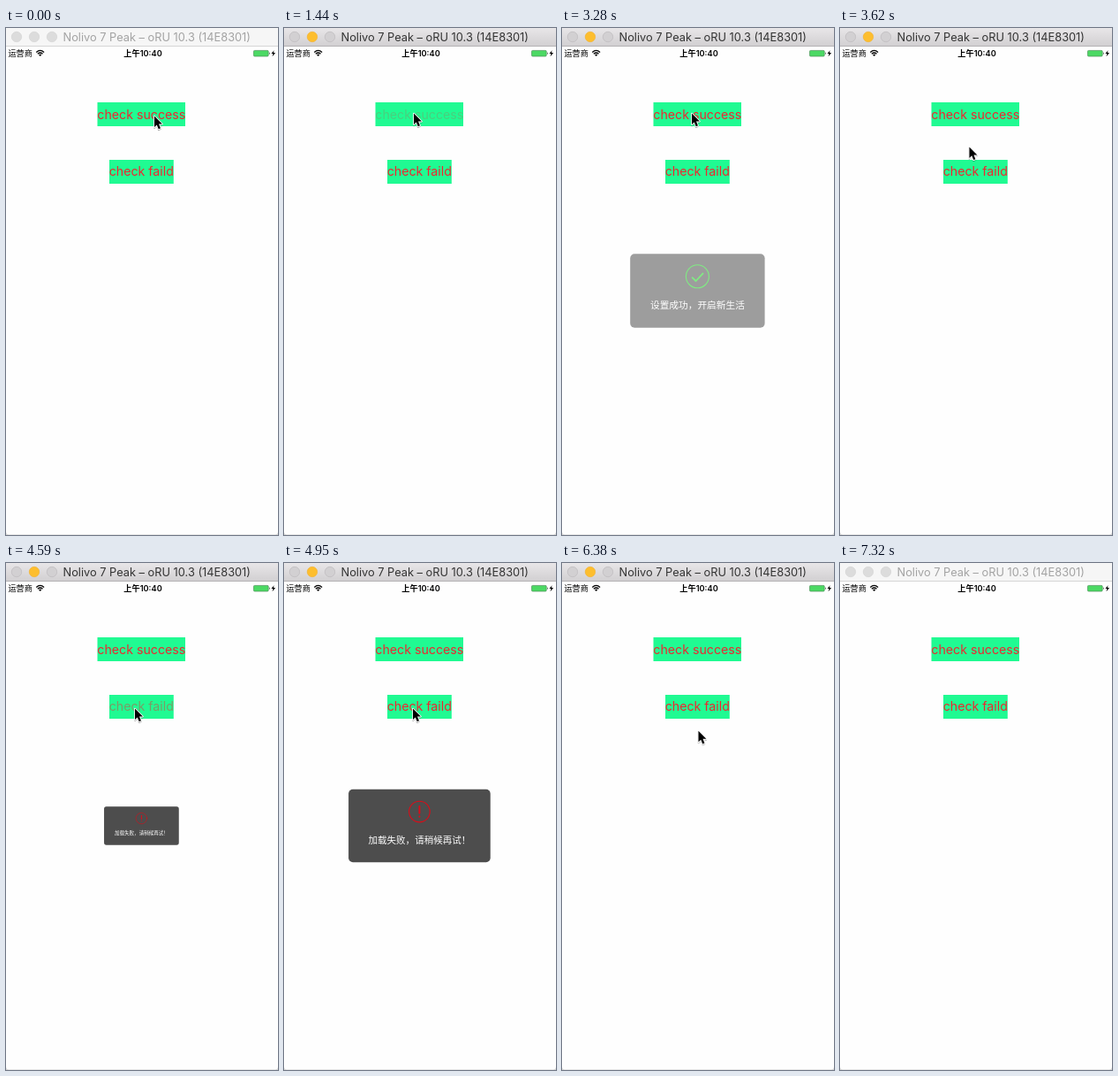
Recreate the animation shown at these times as an HTML page. Size 308 px wide and 573 px high, loop 7420 ms.

```html
<!DOCTYPE html>
<html lang="zh-CN">
<head>
<meta charset="utf-8">
<title>Toast demo</title>
<style>
  html, body { margin: 0; width: 100%; height: 100%; overflow: hidden; background: #fefefe; }
  svg { display: block; width: 100%; height: 100%; }
  text { font-family: Inter, Roboto, sans-serif; }
  .cjk { font-family: "Noto Sans CJK SC", "Noto Sans CJK", sans-serif; }
  .mid { text-anchor: middle; }
  .label { font-size: 14.2px; fill: #ee2630; }
  .msg { font-size: 10.7px; fill: #fff; }
  .line { fill: none; stroke-linecap: round; stroke-linejoin: round; }
</style>
</head>
<body>
<svg viewBox="0 0 308 573">
  <defs>
    <linearGradient id="chrome" x2="0" y2="1">
      <stop offset="0" stop-color="#e8e6e8"/>
      <stop offset="1" stop-color="#d2d0d2"/>
    </linearGradient>
    <filter id="shadow" x="-50%" y="-50%" width="200%" height="200%">
      <feDropShadow dx="0" dy="1" stdDeviation="0.9" flood-opacity="0.4"/>
    </filter>
  </defs>

  <rect width="308" height="573" fill="#d4d4d4"/>
  <rect y="-5" width="308" height="577.5" rx="3.5" fill="#fefefe"/>

  <rect id="bar" width="308" height="20"/>
  <rect id="edge" y="20" width="308" height="1"/>
  <g id="lights"></g>
  <text id="title" x="277" y="14.8" font-size="12.8" text-anchor="end">Nolivo 7 Peak – oRU 10.3 (14E8301)</text>

  <text class="cjk" x="2.5" y="32.2" font-size="9.1">运营商</text>
  <g class="line" stroke="#000" stroke-width="1.3" style="stroke-linecap:butt">
    <path d="M34.3 27.4Q38.7 23.4 43.1 27.4"/>
    <path d="M35.9 29.2Q38.7 26.7 41.5 29.2"/>
  </g>
  <path d="M37.1 30.2Q38.7 28.9 40.3 30.2L38.7 32Z"/>
  <text class="mid" x="155" y="32" font-size="9.2" font-weight="600"><tspan class="cjk">上午</tspan>10:40</text>
  <rect x="280.4" y="25.4" width="16.8" height="6.6" rx="1.2" fill="#4cd964" stroke="#4b8e58" stroke-width=".7"/>
  <path d="M298 27.3q1.4 1.4 0 2.8z"/>
  <path d="M303.6 25.2L300.4 29.1H302.4L301.6 32.2L305 28.1H302.9Z"/>

  <rect x="103.5" y="84" width="99.5" height="27" fill="#20fa92"/>
  <text id="okLabel" class="label mid" x="153.3" y="102.7">check success</text>
  <rect x="117" y="149" width="72.8" height="27" fill="#20fa92"/>
  <text id="badLabel" class="label mid" x="153.3" y="167.2">check faild</text>

  <g id="okToast">
    <rect x="77.2" y="255.2" width="152.4" height="83.6" rx="5" fill="#4d4d4d"/>
    <g class="line" stroke="#16dc1c">
      <circle cx="153.4" cy="280.8" r="13" stroke-width="1.1"/>
      <path d="M147.6 282.2L151.6 286L159.6 277.4" stroke-width="1.8"/>
    </g>
    <text class="msg cjk mid" x="153.4" y="317">设置成功，开启新生活</text>
  </g>
  <g id="badToast">
    <rect x="71.8" y="255.2" width="163.2" height="83.6" rx="5" fill="#4d4d4d"/>
    <g class="line" stroke="#dc0c18">
      <circle cx="153.4" cy="280.8" r="12" stroke-width="1.1"/>
      <path d="M153.4 274.6V282.6M153.4 286.3V286.5" stroke-width="2"/>
    </g>
    <text class="msg cjk mid" x="153.4" y="317">加载失败，请稍候再试！</text>
  </g>

  <g id="cursor">
    <path d="M0 0V15.2L3.4 12L5.8 17.8L8.5 16.7L6.1 11H10.9Z" stroke="#fff" stroke-width="2"
      transform="translate(1 1.6) scale(.82)"
      paint-order="stroke" stroke-linejoin="round" filter="url(#shadow)"/>
  </g>
</svg>
<script>
const LOOP = 7420;
const $ = id => document.getElementById(id);
const set = (el, attrs) => { for (const k in attrs) el.setAttribute(k, attrs[k]); };
const clamp = x => Math.min(1, Math.max(0, x));
const part = (t, from, to) => clamp((t - from) / (to - from));
const smooth = p => p * p * (3 - 2 * p);
const easeOut = p => 1 - (1 - p) * (1 - p);
const mix = (a, b, p) => a + (b - a) * p;
const mixPoint = (a, b, p) => [mix(a[0], b[0], p), mix(a[1], b[1], p)];

const lights = [12, 32, 52].map(cx => {
  const dot = document.createElementNS('http://www.w3.org/2000/svg', 'circle');
  set(dot, { cx, cy: 10, r: 5.7, 'stroke-width': 0.7 });
  $('lights').append(dot);
  return dot;
});

function drawChrome(active) {
  set($('bar'), { fill: active ? 'url(#chrome)' : '#f6f6f6' });
  set($('edge'), { fill: active ? '#b4b2b4' : '#d6d6d6' });
  set($('title'), { fill: active ? '#333' : '#a3a3a3' });
  lights.forEach((dot, i) => {
    const lit = active && i === 1;
    set(dot, {
      fill: lit ? '#fdbe2e' : active ? '#d2d0d2' : '#dcdcdc',
      stroke: lit ? '#f2b436' : active ? '#bdbbbd' : '#d5d5d5'
    });
  });
}

// Pressed text dims at once and recovers after release.
function drawLabel(el, t, down, up) {
  set(el, { opacity: t < down ? 1 : mix(0.2, 1, part(t, up - 5, up + 215)) });
}

// Pop-in: overshoot, slight undershoot, settle.
function popScale(ms) {
  if (ms < 200) return mix(0.1, 1.2, smooth(clamp(ms / 200)));
  if (ms < 350) return mix(1.2, 0.95, smooth((ms - 200) / 150));
  return mix(0.95, 1, smooth(part(ms, 350, 500)));
}

function drawToast(el, t, pop, show, fade, hide) {
  const s = popScale(t - pop);
  const alpha = t < show ? 0 : t < hide ? 1 : 1 - smooth(part(t, fade, fade + 340));
  set(el, {
    opacity: alpha,
    transform: `translate(153.4 297) scale(${s}) translate(-153.4 -297)`
  });
}

const START = [167, 98], BEND = [163, 112.5], OK = [146, 95], BAD = [145, 163];
const CORNER = [275, 550], OUT = [278, 582];

function cursorAt(t) {
  if (t < 3400) {
    const p = t < 420 ? 0 : smooth(part(t, 390, 1080));
    return mixPoint(mixPoint(START, BEND, p), mixPoint(BEND, OK, p), p);
  }
  if (t < 6300) return mixPoint(OK, BAD, easeOut(part(t, 3400, 4060)));
  if (t < 6820) return mixPoint(BAD, CORNER, smooth(part(t, 6300, 6820)));
  return mixPoint(CORNER, OUT, part(t, 6820, 6930));
}

function draw(t) {
  drawChrome(t >= 1440 && t < 7320);
  drawLabel($('okLabel'), t, 1440, 1590);
  drawLabel($('badLabel'), t, 4300, 4530);
  drawToast($('okToast'), t, 1640, 1650, 3120, 3130);
  drawToast($('badToast'), t, 4507, 4530, 6032, 6090);
  set($('cursor'), {
    transform: `translate(${cursorAt(t)})`,
    visibility: t < 6930 ? 'visible' : 'hidden'
  });
}

const begin = performance.now();
function tick() {
  draw((performance.now() - begin) % LOOP);
  requestAnimationFrame(tick);
}
tick();
</script>
</body>
</html>
```
